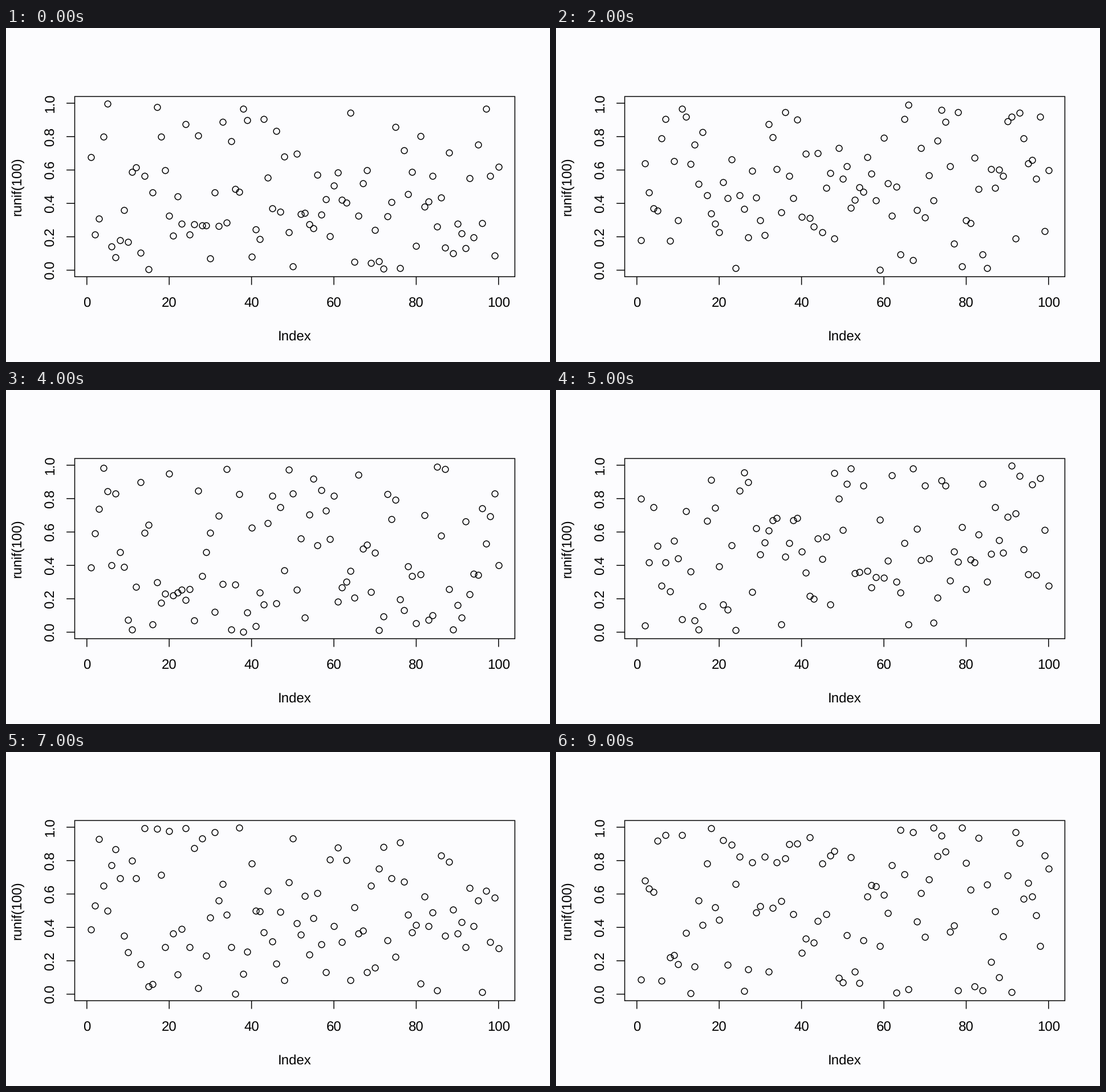
Write a matplotlib script that moves like this. It is 954 px wide and 587 px high and loops after 10 s.

```python
import numpy as np
import matplotlib.pyplot as plt
from matplotlib.animation import FuncAnimation
from matplotlib.patches import Rectangle

W, H, DPI = 954, 587, 64
PT = 72 / DPI                      # points per pixel
INK, PAPER = "#000000", "#fcfcfe"
LINE = 1.5 * PT
LEFT, TOP, RIGHT, BOTTOM = 120.5, 120.4, 892.4, 437.1
TICK = 14.4
N, DRAWS, SEED = 100, 10, 2024


def px(x):
    return 141.8 + 7.22 * x


def py(y):
    return 425.6 - 293.4 * y


def runif(k):
    return np.random.default_rng(SEED + k).uniform(size=N)


plt.rcParams.update({"font.family": "Liberation Sans", "text.hinting": "none"})
fig = plt.figure(figsize=(W / DPI, H / DPI), dpi=DPI, facecolor=PAPER)
ax = fig.add_axes([0, 0, 1, 1])
ax.set_xlim(0, W)
ax.set_ylim(H, 0)
ax.axis("off")


def line(xs, ys):
    ax.plot(xs, ys, color=INK, lw=LINE, solid_capstyle="butt", snap=False)


def label(x, y, s, angle=0):
    ax.text(x, y, s, size=24 * PT, color=INK, ha="center", va="baseline",
            rotation=angle, rotation_mode="anchor")


ax.add_patch(Rectangle((LEFT, TOP), RIGHT - LEFT, BOTTOM - TOP,
                       fill=False, ec=INK, lw=LINE, snap=False))
for v in range(0, 101, 20):
    line([px(v)] * 2, [BOTTOM, BOTTOM + TICK])
    label(px(v), 490.5, str(v))
    y = py(v / 100)
    line([LEFT, LEFT - TICK], [y, y])
    label(85.2, y, f"{v / 100:.1f}", 90)
label((LEFT + RIGHT) / 2, 549, "Index")
label(26.2, (TOP + BOTTOM) / 2, "runif(100)", 90)

dots, = ax.plot([], [], "o", ms=10.8 * PT, mfc="none", mec=INK, mew=LINE,
                snap=False)


def update(k):
    dots.set_data(px(np.arange(1, N + 1)), py(runif(k)))
    return dots,


anim = FuncAnimation(fig, update, frames=DRAWS, interval=1000,
                     repeat=True, repeat_delay=0)
plt.show()
```
